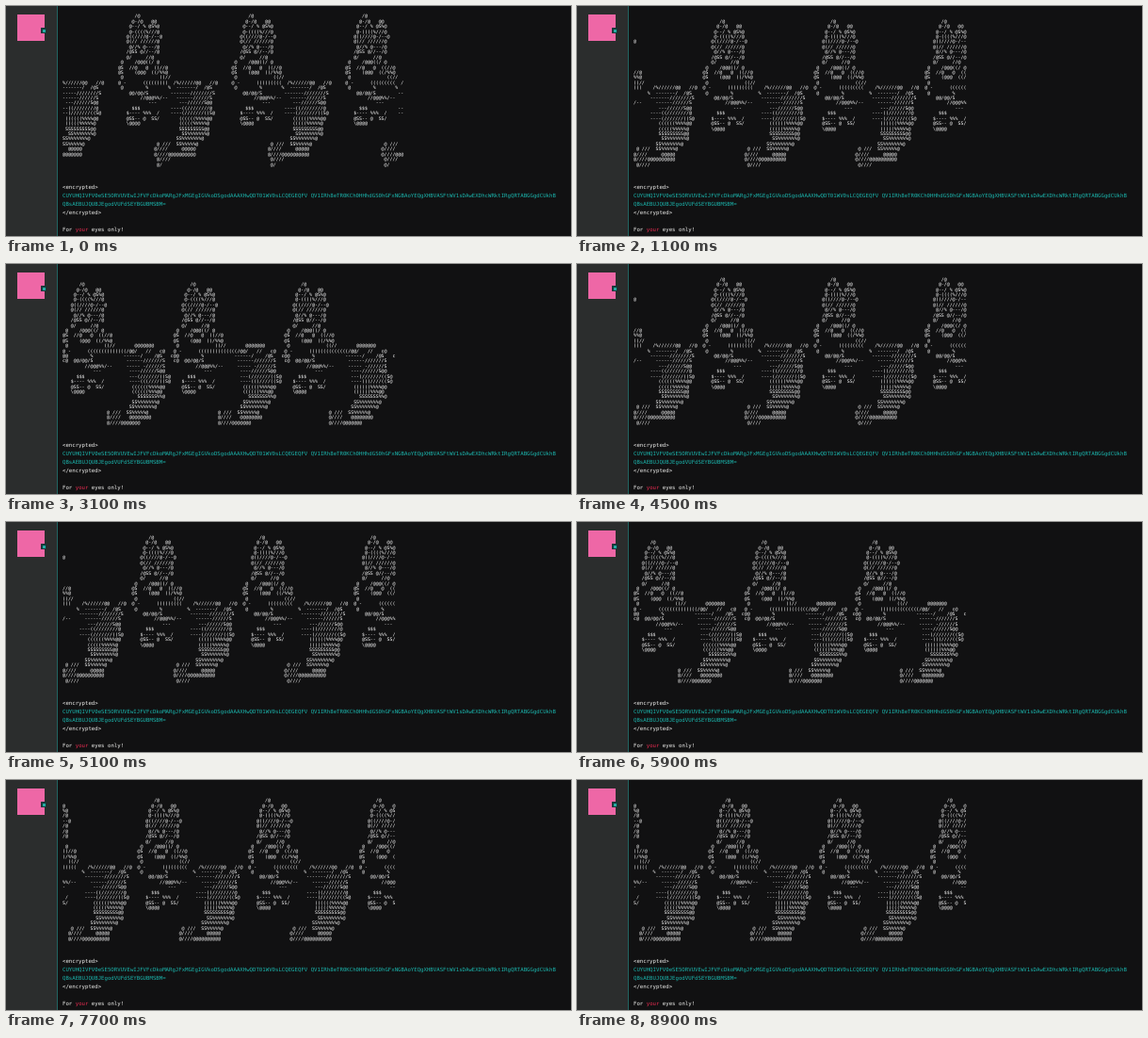
Recreate the animation shown at these times as an HTML page. Size 600 px wide and 244 px high, loop 9 s.

```html
<!DOCTYPE html>
<html lang="en">
<head>
<meta charset="utf-8">
<style>
  html, body { margin: 0; width: 100%; height: 100%; overflow: hidden; background: #111112; }
  body {
    position: relative; color: #f2f2f0;
    font: 5.7px "DejaVu Sans Mono", "Liberation Mono", monospace;
    text-rendering: geometricPrecision;
  }
  pre, p, div, i { position: absolute; margin: 0; white-space: pre; font-family: inherit; }
  #side { left: 0; top: 0; width: 54px; height: 244px; background: #2b2d2d; border-right: 1px solid #216461; }
  #box { left: 12px; top: 9px; width: 29px; height: 28px; background: #ee67a6; }
  #badge { left: 37px; top: 23px; width: 6px; height: 6px; background: #17393a; }
  #badge i { left: 2px; top: 2px; width: 3px; height: 3px; background: #25aaa2; }
  #art { left: 60px; top: 9.3px; font-size: 4.9px; line-height: 5.42px; color: #fff; }
  p { left: 60px; line-height: 9.1px; }
  #message { top: 188.5px; }
  #message span { color: #1bb5ad; }
  #footer { top: 233.5px; }
  #footer span { color: #e62b50; }
</style>
</head>
<body>
<div id="side"></div>
<div id="box"></div>
<div id="badge"><i></i></div>
<pre id="art"></pre>
<p id="message">&lt;encrypted&gt;
<span>CUYUHQIVFV0eSE5ORVUVEwIJFVFcDkoMARgJFxMGEgIGVkoDSgodAAAXHwQDT01WV0sLCQEGEQFV QV1IRh8eTR0KCh0HHhdGS0hGFxNGBAoYEQgXHBVASFtWV1sDAwEXDhcWRktIRgQRTABGGgdCUkhB
QBsAEBUJQUBJEgodVUFdSEYBGUBMSBM=</span>
&lt;/encrypted&gt;</p>
<p id="footer">For <span>your</span> eyes only!</p>
<script>
const lines = text => text.raw[0].split('\n').slice(1);

const head = lines`
       /@
      @-/@   @@
     @--/ % @S%@
     @-((((%///@
    @((////@-/--@
    @(// //////@
     @//% @---/@
    /@SS @//--/@
    @/     //@
  @    /@@@((/ @
 @S  //@   @  ((//@
 @S    (@@@  ((/%%@
  @             ((//
 @ -      (((((((((
  @        %
     @@/@@/S
         //@@@%%/--
            ---
      $$$
    $---- %%%  /
    @SS-- @  SS/
    \@@@@`;

const leapBody = lines`
       /%//////@@   //@
     %  -------/  /@S
      -------////////S
        ------//////S
         ---//////S@@
      ----((////////@
      ----(///////((S@
         ((((((%%%%@@
         (((((%%%%%@
         SSSSSSSSS@@
          SS%%%%%%%@
        SS%%%%%%%@
 @ ///  SS%%%%%@
@////     @@@@@
@////@@@@@@@@@@
 @////
 @/`;

const crouchBody = lines`
           @@@@@@@
   (((((/@@/   //   c@
       ------/    /@S   c@
        ------///////S   c@
        ----- -//////S
         ----//////S@@
         ---(///////((S@
         ----(((////((S@
          ((((((%%%%@@
          ((((((%%%@@
            SSSSSSS%%@
          SS%%%%%%%@
         SS%%%%%%%@
 @ ///  SS%%%%%@
 @////   @@@@@@@@
 @////@@@@@@@`;

const ROWS = 30, COPIES = 3, STEP = 95, LOOP = 9000;
const leap = { body: leapBody, top: 13 };
const crouch = { body: crouchBody, top: 12 };

// One hop to the left: column, row, body offset and pitch of each pose
const hop = [
  { pose: leap, col: 19, row: 0, shift: -2, pitch: 41 },
  { pose: leap, col: 9, row: 1, shift: 0, pitch: 40 },
  { pose: crouch, col: -1, row: 2, shift: 0, pitch: 40 },
  { pose: leap, col: 26, row: 2, shift: 0, pitch: 40 },
  { pose: leap, col: 25, row: 2, shift: 0, pitch: 40 },
  { pose: leap, col: 24, row: 1, shift: 0, pitch: 40 }
];

function render({ pose, col, row, shift, pitch }) {
  const grid = Array.from({ length: ROWS }, () => Array(pitch).fill(' '));
  const stamp = (block, x, y) => block.forEach((line, r) => {
    if (y + r >= ROWS) return;
    [...line].forEach((ch, c) => {
      if (ch !== ' ') grid[y + r][(x + c + pitch) % pitch] = ch;
    });
  });
  stamp(head, col, row);
  stamp(pose.body, col + 16 + shift, row + pose.top);
  return grid.map(cells => cells.join('').repeat(COPIES)).join('\n');
}

const frames = hop.map(render);
const art = document.getElementById('art');
let shown = -1;

function tick() {
  const index = Math.floor(performance.now() % LOOP / STEP) % frames.length;
  if (index !== shown) art.textContent = frames[shown = index];
  requestAnimationFrame(tick);
}
tick();
</script>
</body>
</html>
```
